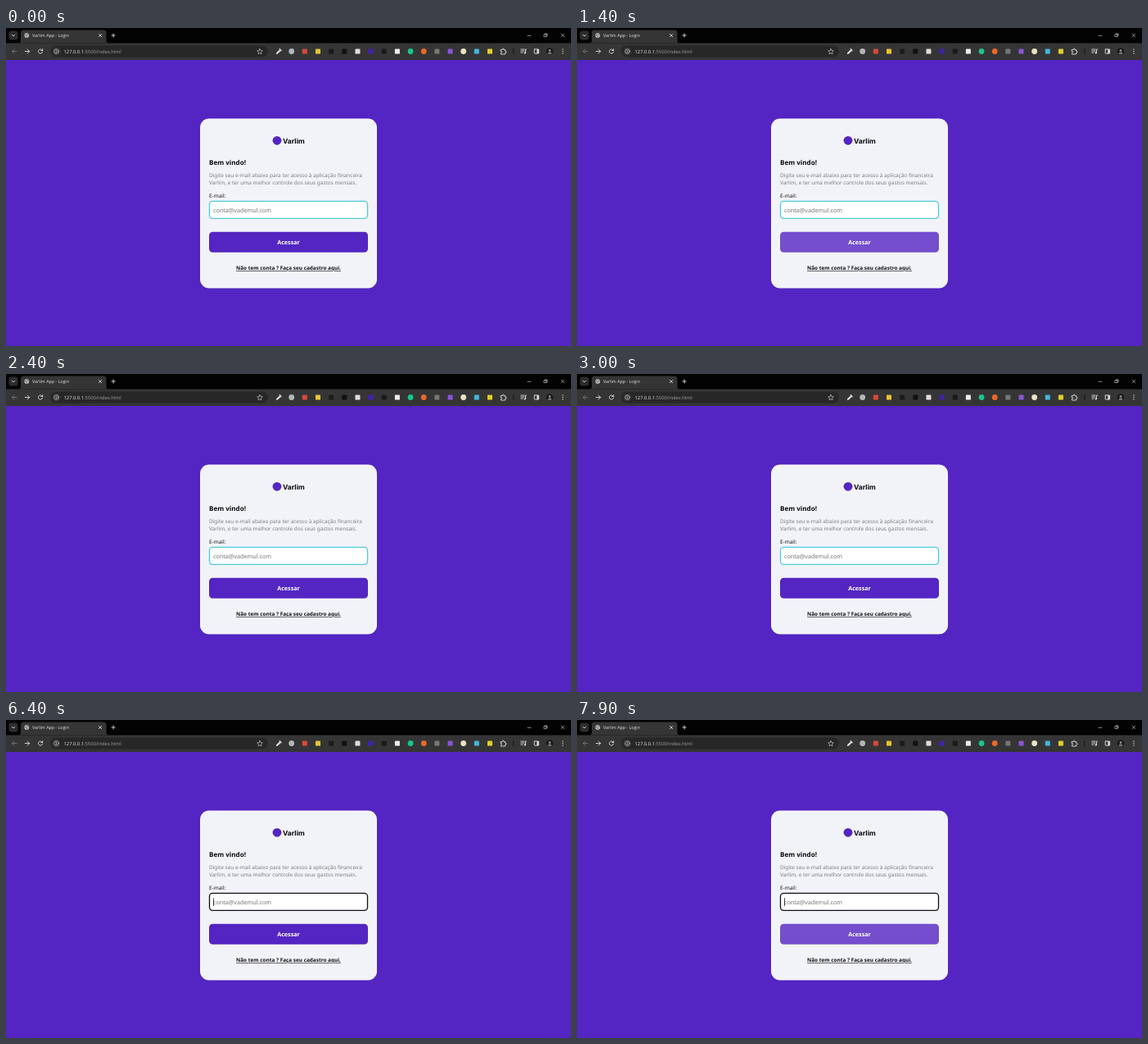
These frames come from a looping animation (690x388 px, 8000 ms). An HTML page:

```html
<!DOCTYPE html>
<html lang="pt-BR">
<head>
<meta charset="utf-8">
<title>Varlim App - Login</title>
<style>
html, body { margin: 0; width: 100%; height: 100%; overflow: hidden; background: #5425c2; }
svg { display: block; width: 100%; height: 100%; }
text { font-family: "Noto Sans", sans-serif; text-rendering: geometricPrecision; }
.ui { font-family: "Open Sans", sans-serif; fill: #e6e6e6; }
.line { fill: none; stroke: #dcdcdc; stroke-width: .9; stroke-linecap: round; stroke-linejoin: round; }
.thin { stroke-width: .6; }
.off { stroke: #777; }
.body { font-size: 6.45px; fill: #7b7b7f; }
.bold { font-weight: 700; }
.mid { text-anchor: middle; }

.button { animation: hover 8s step-end infinite; }
.field { fill: #fff; stroke: #4fcbdc; stroke-width: 1.3; animation: focus 8s step-end infinite; }
.caret { opacity: 0; animation: caret 8s step-end infinite; }
@keyframes hover {
  0%, 30% { opacity: 1; }
  17.5%, 98.75%, 100% { opacity: .8; }
}
@keyframes focus {
  0% { stroke: #4fcbdc; }
  80%, 100% { stroke: #101014; }
}
@keyframes caret {
  0%, 86.25% { opacity: 0; }
  80%, 98.75%, 100% { opacity: 1; }
}
</style>
</head>
<body>
<svg viewBox="0 0 690 388" preserveAspectRatio="none">
  <rect width="690" height="388" fill="#5425c2"/>

  <!-- Tab strip -->
  <rect width="690" height="19" fill="#030303"/>
  <rect x="3.5" y="3.5" width="11" height="11" rx="3.3" fill="#2d2d2d"/>
  <path class="line" d="M7.2 8.2 9 10l1.8-1.8"/>
  <path d="M15 18.5q3 0 3-3V6q0-3.500 3.500-3.500H119q3.500 0 3.500 3.500v9.500q0 3 3 3z" fill="#353535"/>
  <circle cx="25.300" cy="9" r="2.900" fill="#b9bbbd"/>
  <path d="M23 8.200q1.500.2 2 1.500t1.200 1.700M25.300 6.500q.2 1.300 2.300 1.600" fill="none" stroke="#444" stroke-width=".8"/>
  <text class="ui" x="32" y="11" font-size="5.300">Varlim App - Login</text>
  <path class="line" d="m113.500 7.500 3.200 3.200m0-3.200-3.200 3.200M129 9h4.200m-2.100-2.100v4.200"/>
  <path class="line thin" d="M637 9.300h4M657.300 7.800h2.800v2.800h-2.800zM658.300 7.800v-.9h2.700v2.800h-.9M678 7.200l3.600 3.600m0-3.600-3.600 3.600"/>

  <!-- Toolbar -->
  <rect y="18.500" width="690" height="20.500" fill="#353535"/>
  <path class="line off" d="M13 28.500H7.500m2.500-2.500-2.500 2.500 2.500 2.500"/>
  <path class="line" d="M23.300 28.500h5.400m-2.500-2.500 2.500 2.500-2.500 2.500"/>
  <path class="line" d="M44.400 27.300a2.600 2.600 0 1 0 .2 1.900M44.700 25.600v1.900h-1.900"/>
  <rect x="54" y="21.500" width="266" height="14" rx="7" fill="#272727"/>
  <circle cx="61.500" cy="28.500" r="4.800" fill="#393939"/>
  <circle class="line thin" cx="61.500" cy="28.500" r="2.700"/>
  <path class="line thin" d="M61.500 28.300v1.600M61.500 27v.1"/>
  <text class="ui" x="70.500" y="30.700" font-size="5.800">127.0.0.1<tspan fill="#a2a2a2">:5500/index.html</tspan></text>
  <path class="line thin" d="m310 25.400 1 2.100 2.300.3-1.700 1.600.4 2.300-2-1.100-2 1.100.4-2.300-1.700-1.600 2.300-.3z"/>
  <path d="m329.800 32 .5-1.900 3.700-3.700 1.500 1.500-3.700 3.700z" fill="#e4e4e4"/>
  <path d="m333.800 25.300 2.700 2.700" stroke="#e4e4e4" stroke-width="1.300"/>
  <g id="addons"></g>
  <path class="line" d="M604.500 26.500h1.800q-.3-1.500.8-1.500t.8 1.500h1.800v1.800q1.500-.2 1.500.9t-1.500.9v1.900h-5.200v-1.800q1.300 0 1.300-.9t-1.300-.9z"/>
  <path d="M619.800 25v7" stroke="#151515" stroke-width="1"/>
  <path class="line" d="M628.800 26h4.300M628.800 28h4.300M628.800 30h2.300M634.500 30.300V26h1"/>
  <circle cx="633.700" cy="30.400" r="1.100" fill="#dcdcdc"/>
  <rect class="line" x="645.200" y="25.900" width="5.400" height="5.200" rx=".5"/>
  <path d="M648.300 26h2.300v5h-2.300z" fill="#dcdcdc"/>
  <circle cx="664" cy="28.500" r="4.300" fill="#17191b"/>
  <path d="M661.500 31.600q0-2.300 2.500-2.300t2.500 2.300q-2.500 1.500-5 0z" fill="#747474"/>
  <circle cx="664" cy="27.500" r="1.400" fill="#8c8c8c"/>
  <path d="M680 26v.01M680 28.500v.01M680 31v.01" stroke="#e0e0e0" stroke-width="1.300" stroke-linecap="round"/>

  <!-- Login card -->
  <rect x="237" y="110.500" width="216" height="207" rx="11" fill="#f2f3f9"/>
  <circle cx="331" cy="137.300" r="5.400" fill="#5425c2"/>
  <text x="338" y="140.700" font-size="8.500" font-weight="700" style="font-family:Inter,sans-serif" fill="#08080c">Varlim</text>
  <text class="bold" x="248" y="167" font-size="8.070" fill="#09090d">Bem vindo!</text>
  <text class="body" x="248" y="182.300">Digite seu e-mail abaixo para ter acesso à aplicação financeira</text>
  <text class="body" x="248" y="190.800">Varlim, e ter uma melhor controle dos seus gastos mensais.</text>
  <text x="248" y="206.600" font-size="6.450" font-weight="500" fill="#151519">E-mail:</text>
  <rect class="field" x="248.500" y="211.300" width="193" height="21" rx="3.800"/>
  <text x="253" y="224.600" font-size="7.190" fill="#757575">conta@vademul.com</text>
  <path class="caret" d="M253.500 217.300v9.600" stroke="#111" stroke-width=".8"/>
  <g class="button">
    <rect x="248" y="248.700" width="194" height="25" rx="4.500" fill="#5425c2"/>
    <text class="bold mid" x="345" y="264.100" font-size="7.190" fill="#fff">Acessar</text>
  </g>
  <text class="mid" x="345" y="295.200" font-size="6.400" font-weight="600" fill="#111115" text-decoration="underline">Não tem conta ? Faça seu cadastro aqui.</text>
</svg>
<script>
const addons = document.getElementById('addons');
const colors = ['#b4b7ba', '#d8493c', '#e8c52c', '#1b1b1b', '#111', '#e6dcdc', '#4121b0', '#1a1a1a',
  '#eee', '#18c58b', '#e9672b', '#777', '#8a54d8', '#ece3c8', '#43b6da', '#e3ce2d'];
const round = [0, 9, 10, 13];

function add(name, attrs) {
  const el = document.createElementNS('http://www.w3.org/2000/svg', name);
  for (const key in attrs) el.setAttribute(key, attrs[key]);
  addons.append(el);
}

colors.forEach((fill, i) => {
  const x = 348.7 + i * 16.15;
  if (round.includes(i)) add('circle', { cx: x, cy: 28.5, r: 3.4, fill });
  else add('rect', { x: x - 3, y: 25.5, width: 6, height: 6, rx: .6, fill });
});
</script>
</body>
</html>
```
